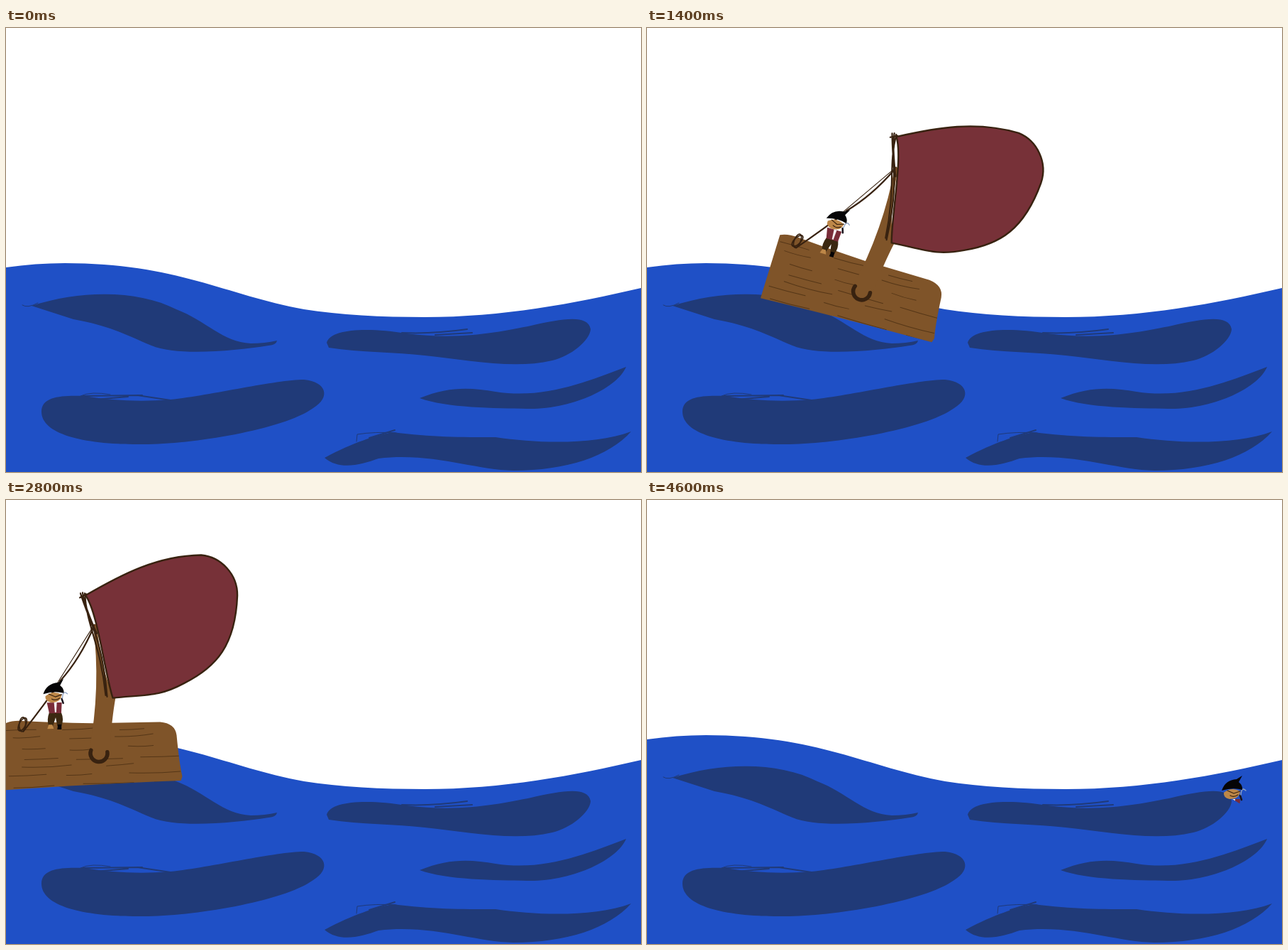
An HTML page with a canvas that plays this animation: 895 by 625 pixels, repeating every 4.8 s.

```html
<!DOCTYPE html>
<html lang="en">
<head>
<meta charset="utf-8">
<title>Little boat</title>
<style>
html, body { margin: 0; width: 100%; height: 100%; overflow: hidden; background: #fff; }
canvas { display: block; }
</style>
</head>
<body>
<canvas id="stage" width="895" height="625"></canvas>
<script>
const ctx = document.getElementById('stage').getContext('2d');
const STEP = 200, LOOP = 4800;
const SEA = '#1f50c6', SHADE = '#203a78', WOOD = '#7f5429', DARK = '#382210',
      SAIL = '#773138', SKIN = '#bd8748', BLACK = '#050406';

const path = d => new Path2D(d);

function fill(shape, color) {
  ctx.fillStyle = color;
  ctx.fill(shape);
}
function stroke(shape, color, width) {
  ctx.strokeStyle = color;
  ctx.lineWidth = width;
  ctx.stroke(shape);
}
function seeded(seed) {
  return () => (seed = seed * 16807 % 2147483647) / 2147483647;
}

// Sea and its shadows
const sea = path('M0,337 C28,333 55,331 83,331 C240,331 310,376 420,396 C470,404 530,407 590,407 C700,407 800,388 895,366 V625 H0 Z');
const shades = [
  'M36,391 C110,367 190,370 240,396 C282,412 305,442 345,444 Q365,444 382,440 Q381,446 370,447 C320,455 240,462 205,447 C165,430 145,419 95,410 Z',
  'M452,443 C457,423 510,421 565,430 C640,440 700,427 740,419 C785,409 820,403 824,424 C823,440 796,462 770,468 C715,481 650,467 590,461 C550,456 500,457 455,450 Z',
  'M50,540 C50,518 80,517 110,518 Q170,528 232,523 C290,517 380,495 420,495 C452,498 458,520 433,535 C390,566 260,586 195,586 C110,587 50,572 50,540 Z',
  'M583,521 C625,504 655,506 690,512 C760,523 820,497 874,477 C862,506 800,537 735,536 C690,535 620,535 583,521 Z',
  'M449,605 C490,583 520,574 545,569 C600,576 640,576 690,576 C750,585 830,587 881,568 C850,603 790,623 715,623 C660,622 600,597 525,606 C500,615 470,623 449,605 Z'
].map(path);
const thinMarks = path('M23,390 Q30,395 45,387 M105,518 Q120,511 147,516 M494,582 L495,572 Q520,568 550,570');
const thickMarks = path('M108,518 L192,517 M125,523 L172,519 M185,517 L232,524 M558,429 Q600,431 650,424 M605,432 L657,429 M512,577 L548,566');

// Boat, drawn upright around the knot at the foot of the mast
const KNOT = [538, 409];
const hull = path('M405,360 Q415,355 430,356 Q470,359 530,361 L625,361 Q646,363 648,380 Q651,420 655,438 L653,444 Q520,447 404,453 Z');
const mast = path('M524,402 Q543,310 533,222 H538 Q545,300 563,325 Q557,355 553,402 Q538,425 524,402 Z');
const sail = path('M523,181 C575,152 625,127 687,127 C715,130 738,155 737,185 C733,255 706,285 660,307 C625,325 610,322 559,326 C548,290 540,205 523,181 Z');
const rigging = path('M516,178 C530,225 545,240 551,324 M522,178 C524,225 543,250 549,322 M515,184 L524,179 M519,177 Q521,195 538,235');
const stay = path('M534,225 Q514,270 485,301');
const thinStay = path('M535,222 L481,304');
const coil = path('M486,301 Q463,333 432,371');
const knot = path('M527,399 A12,12 0 1 0 550,402');
const grain = woodGrain(7, 13);

function woodGrain(rows, gap) {
  const rand = seeded(11), lines = new Path2D();
  for (let row = 0; row < rows; row++) {
    for (let x = 408 + rand() * 25; x < 625; x += 25 + rand() * 30) {
      const y = 366 + row * gap + rand() * 7, w = 28 + rand() * 45;
      lines.moveTo(x, y);
      lines.quadraticCurveTo(x + w / 2, y + rand() * 3 - 1, x + w, y - 3 + rand() * 3);
      x += w;
    }
  }
  return lines;
}

// Sailor
const hat = path('M461,319 Q466,304 482,303 L490,298 L485,307 Q491,312 490,318 Q477,314 461,319 Z');
const head = path('M464,322 Q475,313 487,320 Q486,331 472,331 Q463,329 464,322 Z');
const vest = path('M466,331 H487 L486,346 H469 Z');
const shirt = path('M476,331 H480 L479,345 H477 Z');
const pants = path('M469,345 H486 Q490,355 486,364 H480 L478,352 L474,364 H468 Q465,355 469,345 Z');
const foot = path('M468,362 H473 L475,368 H466 Z');
const boot = path('M481,362 H486 V369 H480 Z');
const face = path('M469,319 L478,323 L487,320 M473,326 Q478,329 484,325');
const sleeve = path('M487,326 L489,332');
const hook = path('M488,325 Q489,313 495,319');

function sailor() {
  fill(pants, '#3b2811');
  fill(foot, SKIN);
  fill(boot, BLACK);
  fill(vest, '#792c39');
  fill(shirt, '#f4eef0');
  fill(head, SKIN);
  stroke(face, DARK, 1.2);
  stroke(sleeve, '#17121a', 2.5);
  stroke(hook, '#8fa2c4', 1.3);
  fill(hat, BLACK);
}

const aboveWater = path('M300,60 H895 V470 H720 L668,462 L585,432 L540,421 H300 Z');
const headRoom = path('M455,290 H491 L487,328 H455 Z');
const chestRoom = path('M455,290 H500 V337 H486 L476,331 H455 Z');

function boat(x, y, turn, sunk, bare) {
  ctx.save();
  if (sunk) ctx.clip(aboveWater);
  ctx.translate(x, y);
  ctx.rotate(turn * Math.PI / 180);
  ctx.translate(-KNOT[0], -KNOT[1]);
  fill(hull, WOOD);
  ctx.save();
  ctx.clip(hull);
  stroke(grain, '#553617', 1);
  ctx.restore();
  if (!bare) {
    fill(mast, WOOD);
    stroke(knot, DARK, 5.5);
    fill(sail, SAIL);
    stroke(sail, DARK, 2.4);
    stroke(rigging, DARK, 2.2);
    stroke(stay, DARK, 2.3);
    stroke(thinStay, DARK, 1.1);
  }
  if (!sunk) {
    stroke(coil, DARK, 2.2);
    for (const tilt of [.1, .5]) {
      const loop = new Path2D();
      loop.ellipse(431, 361, 4.5, 10, tilt, 0, 7);
      stroke(loop, DARK, 1.8);
    }
    sailor();
  }
  ctx.restore();
}

function swimmer(x, y, room) {
  ctx.save();
  ctx.translate(x, y);
  ctx.clip(room);
  sailor();
  ctx.restore();
}

const sink = (dx, dy, bare) => boat(644 + dx, 409 + dy, -71.5, true, bare);

const poses = {
  a: () => boat(131, 362, -1),
  b: () => boat(301, 376, 16.5),
  c: () => boat(538, 409, 0),
  d: () => boat(704, 403, -13),
  e: () => boat(876, 359, -13),
  f: () => boat(605, 410, -33),
  g: () => sink(0, 0),
  h: () => sink(-9, 68),
  i: () => sink(-8, 90),
  j: () => sink(-9, 96, true),
  k: () => swimmer(63, 141, headRoom),
  l: () => swimmer(149, 132, headRoom),
  m: () => swimmer(349, 90, chestRoom)
};
const order = '-abcdeabcdeaceabfghijklm';

function frame() {
  const pose = poses[order[Math.floor(performance.now() % LOOP / STEP)]];
  ctx.fillStyle = '#fff';
  ctx.fillRect(0, 0, 895, 625);
  ctx.lineCap = ctx.lineJoin = 'round';
  fill(sea, SEA);
  for (const s of shades) fill(s, SHADE);
  stroke(thinMarks, SHADE, 1);
  stroke(thickMarks, SHADE, 2);
  if (pose) pose();
  requestAnimationFrame(frame);
}
frame();
</script>
</body>
</html>
```
